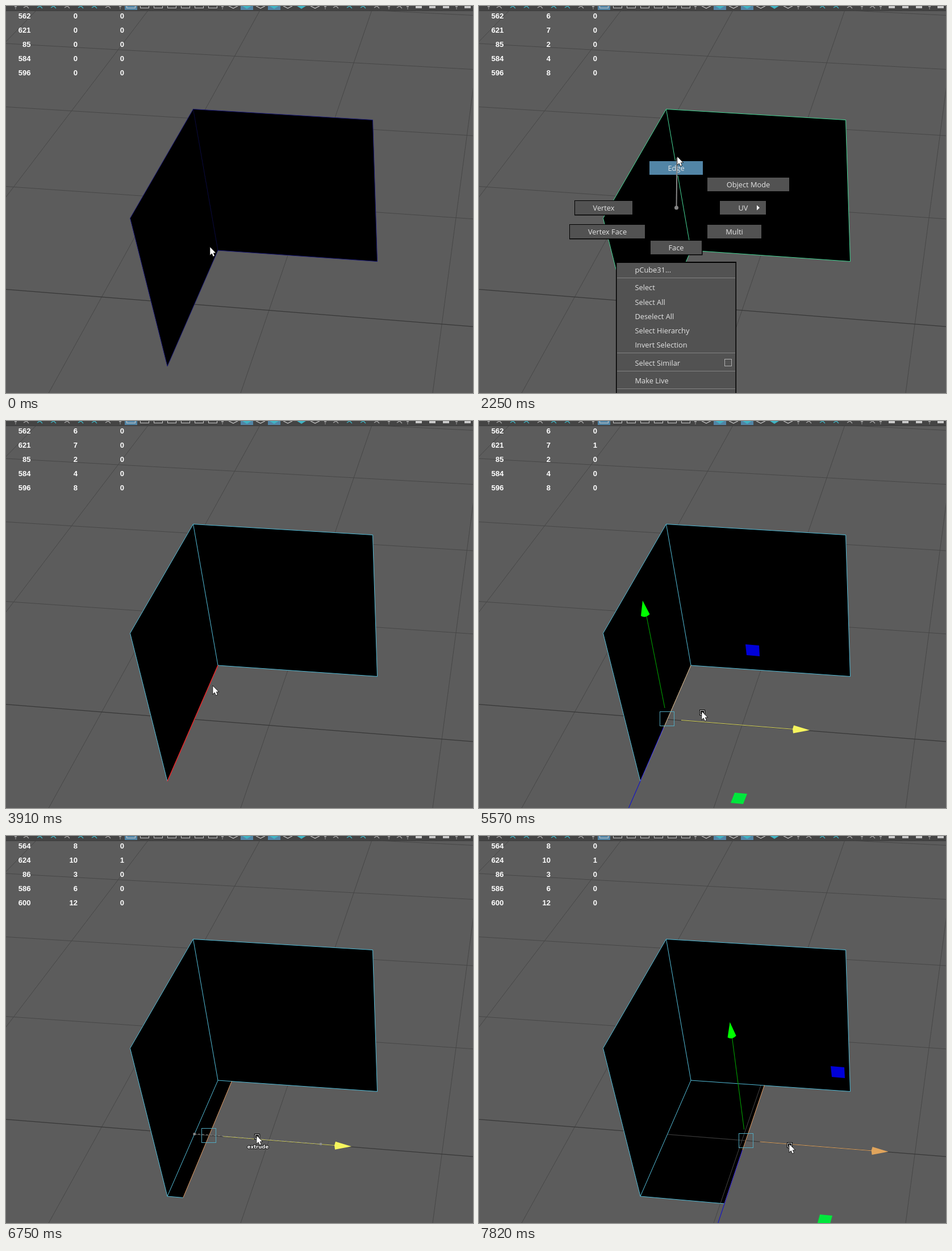
Recreate the animation shown at these times as an HTML page with a canvas. Size 822 by 681 pixels, loop 8 s.

```html
<!DOCTYPE html>
<html lang="en">
<head>
<meta charset="utf-8">
<title>Edge extrude</title>
<style>
html, body { margin: 0; width: 100%; height: 100%; overflow: hidden; background: #5c5c5c; }
canvas { display: block; }
</style>
</head>
<body>
<canvas id="stage" width="822" height="681"></canvas>
<script>
const ctx = document.getElementById('stage').getContext('2d');
const W = 822, H = 681, LOOP = 8000, STEP = 130;
const UI_FONT = '12.8px "Open Sans", "Noto Sans", sans-serif';
const HUD_FONT = 'bold 13px "Liberation Sans", Arial, sans-serif';
const TIP_FONT = 'bold 8.5px "DejaVu Sans", sans-serif';

// Moments when something happens
const PICK = 550, MENU = 1680, EDGE_HOT = 2090, EDGE_MODE = 3110, HOVER_SEAM = 3640, HOVER_BASE = 3760,
  SELECT = 4460, TOOL = 5570, HOVER_AXIS = 5840, DRAG = 6610, GROW = 6750, DROP = 7430, REST = 7820;

// Corners of the two walls
const A = [329.5, 181.5], B = [645.5, 200.5], C = [653.5, 449.5];
const D = [373, 430], E = [218.5, 373.5], F = [284, 634];

// Pointer strokes: start time, steps, end point
const STROKES = [
  [120, 3, 354, 359], [950, 1, 364, 356], [1250, 3, 348, 354], [EDGE_HOT, 2, 349, 265],
  [HOVER_SEAM, 3, 364, 466], [SELECT, 3, 392, 511], [5690, 2, 410, 527], [6100, 3, 417, 523]
];

const mix = (a, b, k) => a + (b - a) * k;
const within = (t, from, to) => t >= from && t < to;
const shift = (p, dx, dy) => [p[0] + dx, p[1] + dy];
const stepped = (t, start, n) => t < start ? 0 : Math.min(1, (Math.floor((t - start) / STEP) + 1) / n);
const extrusion = t => 1 - (1 - stepped(t, GROW, 4) ** 1.95) ** 3;

function pointerAt(t, k) {
  let x = 359, y = 424;
  for (const [start, n, u, v] of STROKES) {
    const e = 1 - (1 - stepped(t, start, n)) ** 2;
    x = mix(x, u, e);
    y = mix(y, v, e);
  }
  return [x + 129 * k, y + 19 * k];
}

function line(color, width, ...pts) {
  ctx.strokeStyle = color;
  ctx.lineWidth = width;
  ctx.beginPath();
  pts.forEach(p => ctx.lineTo(p[0], p[1]));
  ctx.stroke();
}

function poly(color, ...pts) {
  ctx.fillStyle = color;
  ctx.beginPath();
  pts.forEach(p => ctx.lineTo(p[0], p[1]));
  ctx.fill();
}

function rect(color, x, y, w, h) {
  ctx.fillStyle = color;
  ctx.fillRect(x, y, w, h);
}

function frame(color, x, y, w, h) {
  ctx.strokeStyle = color;
  ctx.lineWidth = 1;
  ctx.strokeRect(x + 0.5, y + 0.5, w - 1, h - 1);
}

function disc(color, x, y, r) {
  ctx.fillStyle = color;
  ctx.beginPath();
  ctx.arc(x, y, r, 0, 7);
  ctx.fill();
}

function label(str, x, y, font, color, align) {
  ctx.font = font;
  ctx.fillStyle = color;
  ctx.textAlign = align;
  ctx.fillText(str, x, y);
}

// Ground plane in perspective; the last row is the darker main axis
function drawGrid() {
  for (let i = 0; i < 5; i++) {
    const x = y => 841.6 - 195.2 * i - y * (0.133 + 0.2096 * i);
    line('#474747', 1, [x(0), 0], [x(H), H]);
  }
  for (let j = -1; j < 4; j++) {
    const y = (66 + 93.43 * j) / (1 - 0.1018 * j);
    const slope = 0.0554 + (y - 66) * 0.0000563;
    line(j === 3 ? '#373737' : '#474747', j === 3 ? 1.2 : 1, [0, y], [W, y + slope * W]);
  }
}

const ICONS = {
  tool(x, i) {
    line(i % 3 ? '#3fb4c4' : '#a8a8a8', 1.4, [x - 5, 3], [x, 0], [x + 4, 4]);
  },
  panel(x) {
    frame('#c8c8c8', x - 8, -6, 16, 10);
  },
  solid(x, i) {
    if (i % 2) poly('#3fb4c4', [x - 8, 0], [x + 8, 0], [x, 5]);
    else line('#c8c8c8', 1.2, [x - 8, 0], [x, 4], [x + 8, 0]);
  },
  block(x) {
    rect('#c8c8c8', x - 5, 0, 11, 4);
  }
};

function drawToolbar() {
  rect('#444444', 0, 0, W, 9);
  rect('#3b3b3b', 0, 8, W, 1);
  [220, 424, 472].forEach(x => rect('#5285a6', x - 11, 0, 22, 7));
  const groups = [[36, 7, 'tool'], [220, 7, 'panel'], [400, 7, 'solid'], [581, 4, 'tool'],
    [693, 1, 'tool'], [726, 3, 'block'], [812, 1, 'block']];
  for (const [x, n, kind] of groups) {
    rect('#969696', x - 21, 0, 4, 2);
    rect('#969696', x - 19.5, 2, 1, 4);
    for (let i = 0; i < n; i++) ICONS[kind](x + 24 * i, i);
  }
}

function drawHud(t) {
  const grown = t >= GROW;
  const total = grown ? [564, 624, 86, 586, 600] : [562, 621, 85, 584, 596];
  const own = grown ? [8, 10, 3, 6, 12] : [6, 7, 2, 4, 8];
  total.forEach((n, i) => {
    const row = [n, t >= PICK ? own[i] : 0, t >= SELECT && i === 1 ? 1 : 0];
    row.forEach((v, c) => label(v, [43.5, 126, 208][c], 22 + 25 * i, HUD_FONT, '#ffffff', 'right'));
  });
}

function drawMesh(t, k) {
  const G = shift(D, 129.3 * k, 8.5 * k), K = shift(F, 148 * k, 13 * k);
  if (k) poly('#000', D, G, K, F);
  drawGrid();
  poly('#000', A, B, C, D);
  poly('#000', A, D, F, E);
  const edge = t < PICK ? '#1b1b78' : t < EDGE_MODE ? '#45d696' : '#52bcd8';
  line(edge, 1, A, B, C, D, F, E, A);
  line(t < PICK ? '#07073c' : edge, 1, A, D);
  if (k) line(edge, 1, F, K);
  if (within(t, HOVER_SEAM, HOVER_BASE)) line('#f01818', 1.4, A, D);
  if (within(t, HOVER_BASE, SELECT)) line('#f01818', 1.4, D, F);
  if (t >= SELECT) line('#e09a62', 1, G, K);
}

function cone(color, x, y, u, v, w, z) {
  ctx.fillStyle = color;
  ctx.beginPath();
  ctx.moveTo(x, y);
  ctx.lineTo(x + u, y + v);
  ctx.quadraticCurveTo(x + (u + w) / 2 * 1.02, y + (v + z) / 2 + 6, x + w, y + z);
  ctx.fill();
}

function drawGizmo(t, k) {
  const drag = within(t, DRAG, DROP);
  const hover = t >= REST || within(t, HOVER_AXIS, DRAG);
  const x = 331 + 138.6 * k, y = 524 + 11.5 * k;
  line(hover ? '#d8a060' : '#d4d25c', 1, [x + 25, y + 2.5], [x + 224, y + 18.5]);
  if (drag) {
    ctx.setLineDash([4, 3]);
    line('#8c8c88', 1, [331, 524], [554, 542]);
    ctx.setLineDash([]);
    rect('#8c8c8c', 329.5, 522.5, 4, 4);
    rect('#8c8c8c', 552, 540, 4, 4);
  }
  poly(hover ? '#e0a45c' : '#f6f55e', [x + 223, y + 11.5], [x + 251, y + 20], [x + 222, y + 25.5], [x + 221, y + 18]);
  frame('#52a9c0', Math.round(x - 12.6), Math.round(y - 12.6), 26, 26);
  if (drag) return;

  line('#1414c8', 1.1, [x - 6, y + mix(15, 17, k)], [x - mix(67.5, 49, k), y + mix(157, 146, k)]);
  const gx = x - mix(43, 28, k), gy = y - 208;
  line('#00a000', 1.1, [x - mix(4, 3, k), y - 19], [gx + mix(7, 4, k), gy + 28]);
  cone('#00ff00', gx, gy, mix(12.5, 11, k), 24, mix(-3, -4, k), 27);

  const bx = 469 + 150 * k, by = 393 + 12 * k;
  poly('#0000d8', [bx, by], [bx + 24, by + 2], [bx + 25, by + 21], [bx + 2, by + 19]);
  const qx = 450 + 150 * k, qy = by + 261;
  poly('#00e63c', [qx, qy], [qx + 22, qy + 2], [qx + mix(15, 17, k), qy + 20], [qx - mix(7, 5, k), qy + 18]);
}

function button(str, x, y, w, fill = '#525252', textX = x + w / 2) {
  rect('#000', x - 1, y - 1, w + 2.5, 26.5);
  rect(fill, x, y, w, 24);
  label(str, textX, y + 17, UI_FONT, '#e4e4e4', 'center');
}

function drawMenu(t, px, py) {
  const hot = t >= EDGE_HOT;
  button('Edge', 300, 273, 94, hot ? '#5285a6' : undefined);
  button('Object Mode', 402, 302, 144);
  button('Vertex', 169, 343, 101);
  button('UV', 424, 343, 81, undefined, 465);
  poly('#ffffff', [489, 350.5], [494, 355], [489, 359.5]);
  button('Vertex Face', 160, 385, 132);
  button('Multi', 402, 385, 95);
  button('Face', 302, 413, 90);

  rect('#000', 241, 450, 212, H);
  rect('#525252', 242.5, 452, 209, H);
  const groups = [['pCube31...'], ['Select', 'Select All', 'Deselect All', 'Select Hierarchy', 'Invert Selection'],
    ['Select Similar'], ['Make Live']];
  let y = 469;
  for (const items of groups) {
    for (const s of items) {
      label(s, 274.5, y, UI_FONT, '#e4e4e4', 'left');
      y += 25.2;
    }
    rect('#838383', 243, Math.round(y - 16), 208, 1);
    y += 6.2;
  }
  frame('#b0b0b0', 432, 621, 13, 13);

  if (hot) line('#868686', 2, [347.5, 355], [px - 0.5, py + 2]);
  disc('#868686', 347.5, 355, 3.5);
}

function drawPointer(t, x, y) {
  if (t >= TOOL) {
    rect('#000', x - 4, y - 3, 10, 10);
    frame('#d8d8d8', x - 3, y - 2, 8, 8);
  }
  ctx.beginPath();
  [[0, 0], [0, 13.5], [3.2, 10.7], [5.4, 16], [7.6, 15], [5.4, 10], [9.5, 9.8]]
    .forEach(([u, v]) => ctx.lineTo(x + 0.3 + u, y + 0.5 + v));
  ctx.closePath();
  ctx.lineWidth = 1.5;
  ctx.strokeStyle = '#151515';
  ctx.stroke();
  ctx.fillStyle = '#fff';
  ctx.fill();
  if (within(t, GROW, DROP)) {
    ctx.font = TIP_FONT;
    ctx.textAlign = 'center';
    ctx.lineWidth = 2;
    ctx.lineJoin = 'round';
    ctx.strokeText('extrude', x + 2.5, y + 22.5);
    ctx.lineJoin = 'miter';
    label('extrude', x + 2.5, y + 22.5, TIP_FONT, '#fff', 'center');
  }
}

function draw(t) {
  const k = extrusion(t);
  const [px, py] = pointerAt(t, k).map(Math.round);
  rect('#5c5c5c', 0, 0, W, H);
  drawMesh(t, k);
  drawToolbar();
  drawHud(t);
  if (t >= TOOL) drawGizmo(t, k);
  if (within(t, MENU, EDGE_MODE)) drawMenu(t, px, py);
  drawPointer(t, px, py);
}

const start = performance.now();
function tick() {
  draw((performance.now() - start) % LOOP);
  requestAnimationFrame(tick);
}
tick();
</script>
</body>
</html>
```
